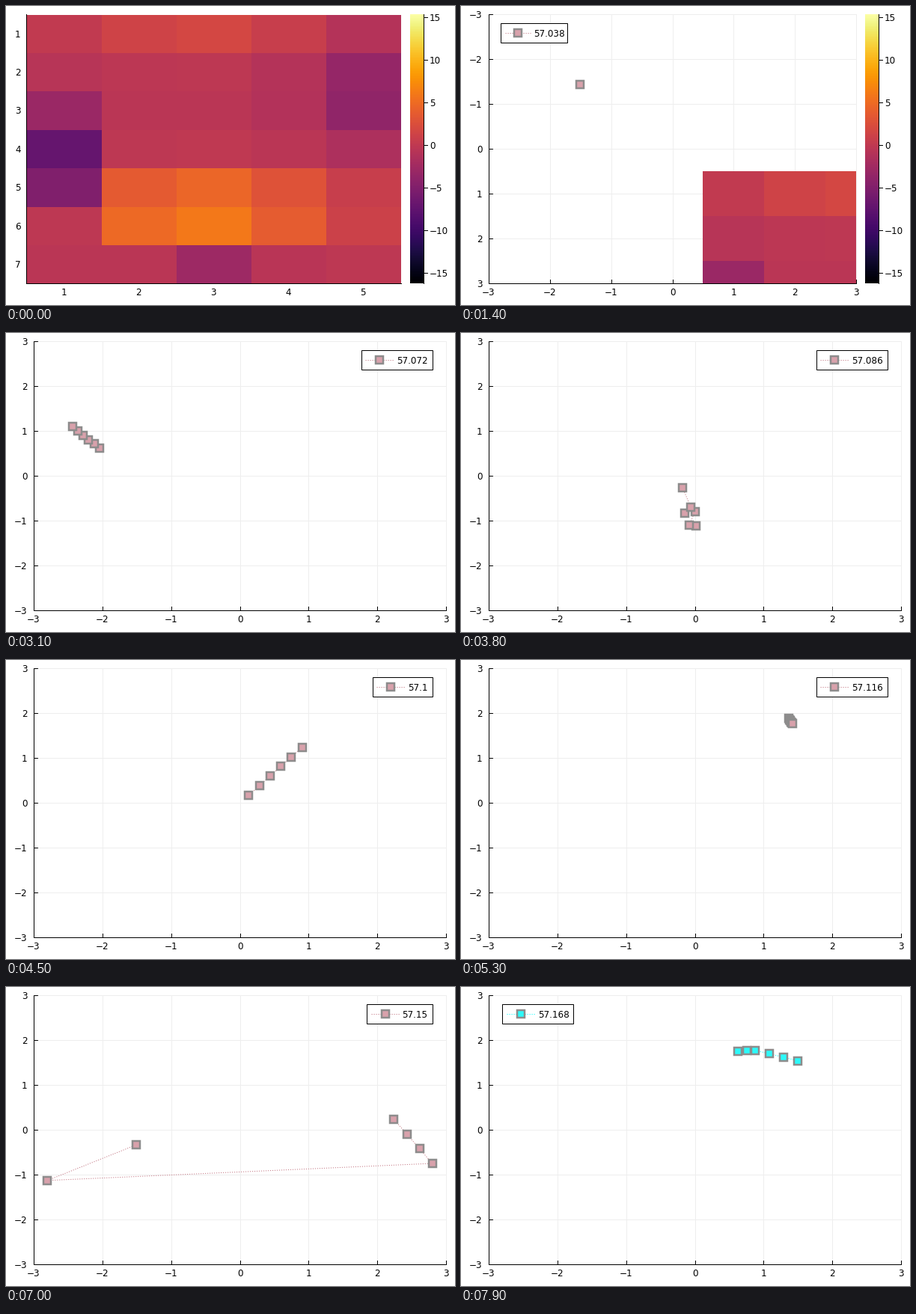
Animation, 600 px wide and 400 px high, one loop 8 s. Source, as a matplotlib script:

```python
import numpy as np
import matplotlib.pyplot as plt
from matplotlib.animation import FuncAnimation
from matplotlib.patches import Rectangle

W, H, DPI = 600, 400, 100
PX = 72 / DPI                      # points per pixel
FRAMES, STEP = 80, 100
LEFT, TOP, BOTTOM, MID = 37, 11, 371, 191
ROWS, COLS = 7, 5
FIRST = 14                         # frame of the first marker
CYAN_FROM = 77
TRAIL = 6

PINK, CYAN, EDGE = "#d8a1ab", "#2bfafa", "#8d8c8c"
PINK_LINE, CYAN_LINE = "#c8808c", "#19ffff"

plt.rcParams["font.family"] = "DejaVu Sans"
plt.rcParams["font.size"] = 12 * PX

# Warm and cold spots of the map: column, row, strength, width, height.
SPOTS = [
    (2.8, 5.6, .25, 1.8, .9),
    (1, 4.45, -.24, .5, 1.4),
    (5, 2.6, -.12, .8, 1.3),
    (2.8, 1, .07, 1.5, .6),
    (3, 7, -.1, .8, .5),
]

# Runs of the moving point: (step, x, y); steps between are interpolated.
RUNS = [
    [(14, -1.51, -1.44), (17, -1.55, -.7), (18, -1.74, -.27),
     (19, -1.83, -.1), (20, -1.74, -.02), (22, -1.74, .22), (31, -2.43, 1.1)],
    [(33, .02, -1.11), (34, -.08, -1.1), (35, 0, -.8), (36, -.15, -.84),
     (37, -.06, -.7), (38, -.18, -.26), (48, 1.37, 1.88), (53, 1.42, 1.76),
     (57, -1, -1.68)],
    [(59, -.39, 2.05), (60, -.76, 1.7), (61, -.63, 1.03), (64, -.21, .46),
     (66, -2.8, -1.13), (67, 2.8, -.75), (74, 1.5, 1.54), (77, .88, 1.77),
     (79, .63, 1.75)],
]

fig = plt.figure(figsize=(W / DPI, H / DPI), dpi=DPI, facecolor="white")
ax = fig.add_axes([0, 0, 1, 1])


def line(x, y, color="black", z=3, **kw):
    ax.plot(x, y, color=color, lw=PX, zorder=z, **kw)


def label(x, y, text, ha="center"):
    ax.text(x, y + 4.9, text, ha=ha, va="baseline", color="black", zorder=6)


def number(v):
    return str(v).replace("-", "\u2212")


def heat(col, row):
    return .5 + sum(a * np.exp(-((col - c) / w) ** 2 - ((row - r) / h) ** 2)
                    for c, r, a, w, h in SPOTS)


def trail(i):
    """Points shown at step i; empty between two runs."""
    for run in RUNS:
        steps, x, y = np.array(run).T
        if steps[0] <= i <= steps[-1]:
            s = np.arange(max(steps[0], i - TRAIL + 1), i + 1)
            return np.interp(s, steps, x), np.interp(s, steps, y)
    return None


def spines(left, right):
    line([left, left], [TOP, BOTTOM], solid_capstyle="projecting")
    line([left, right], [BOTTOM, BOTTOM], solid_capstyle="projecting")


def heatmap(left, top, cell_w, cell_h, right):
    clip = Rectangle((left, top), right - left, BOTTOM - top,
                     transform=ax.transData)
    for r in range(ROWS):
        for c in range(COLS):
            cell = Rectangle((left + c * cell_w, top + r * cell_h),
                             cell_w, cell_h, lw=0, antialiased=False,
                             fc=plt.cm.inferno(heat(c + 1, r + 1)), zorder=2)
            ax.add_patch(cell)
            cell.set_clip_path(clip)


def colorbar():
    ramp = np.linspace(1, 0, 256)[:, None]
    ax.imshow(ramp, cmap="inferno", vmin=0, vmax=1, aspect="auto",
              extent=(540, 558, BOTTOM, TOP), zorder=2)
    line([558, 558], [TOP, BOTTOM])
    for v in range(-15, 16, 5):
        y = 186 - v * 11.4
        line([558, 563], [y, y])
        label(566, y, number(v), "left")


def full_heatmap():
    left, right = 27, 528
    cell_w, cell_h = 100, (BOTTOM - TOP) / ROWS
    heatmap(left + .5, TOP + .5, cell_w, cell_h, right)
    spines(left, right)
    for c in range(COLS):
        label(left + cell_w * (c + .5), 382, number(c + 1))
    for r in range(ROWS):
        label(19.5, TOP + cell_h * (r + .5), number(r + 1), "right")
    colorbar()


def plane(right, sign):
    """Empty plot from -3 to 3 on both axes; gives the x unit."""
    unit = (right - LEFT) / 6
    for v in range(-3, 4):
        x = LEFT + (v + 3) * unit
        y = MID + sign * 60 * v
        line([x, x], [TOP, BOTTOM], "#eeeeee", 1)
        line([LEFT, right], [y, y], "#eeeeee", 1)
        line([x, x], [BOTTOM, BOTTOM - 5], z=1.5)
        line([LEFT, LEFT + 5], [y, y], z=1.5)
        label(x, 382, number(v))
        label(28.7, y, number(v), "right")
    spines(LEFT, right)
    return unit


def chain(x, y, cyan, z):
    """Dotted line with square markers on it."""
    line(x, y, CYAN_LINE if cyan else PINK_LINE, z, ls=(0, (1.2, 1.8)),
         dash_capstyle="butt")
    x, y = (x, y) if len(x) != 2 or z < 5 else ([np.mean(x)], [np.mean(y)])
    ax.plot(x, y, ls="none", marker="s", ms=10 * PX, mec=EDGE,
            mfc=CYAN if cyan else PINK, mew=2.5 * PX, zorder=z + .2)


def legend(text, cyan, left, width, sample):
    """Box with a dotted sample line, a marker and the time."""
    ax.add_patch(Rectangle((left, 23), width, 26, fc="white", ec="black",
                           lw=PX, zorder=5))
    a = left + 5.5
    chain([a, a + sample], [36, 36], cyan, 5.2)
    label(a + sample + 3.8, 36.3, text, "left")


def scatter(i):
    first = i == FIRST
    right, sign = (528, 1) if first else (588, -1)
    unit = plane(right, sign)
    if first:
        heatmap(LEFT + 3.5 * unit, MID + 30, unit, 60, right)
        colorbar()

    points = trail(i)
    if points is None:
        return
    cyan = i >= CYAN_FROM
    chain(LEFT + (points[0] + 3) * unit, MID + sign * 60 * points[1], cyan, 4)

    text = str(round(57.038 + .002 * (i - FIRST), 3))
    width = (89 if first else 95) - 7.63 * (6 - len(text))
    pad = (right - LEFT) / 30
    left = LEFT + pad if first or cyan else right - pad - width
    legend(text, cyan, left, width, 34 if first else 38)


def draw(i):
    ax.clear()
    if i < FIRST:
        full_heatmap()
    else:
        scatter(i)
    ax.set_xlim(0, W)
    ax.set_ylim(H, 0)
    ax.axis("off")
    return []


anim = FuncAnimation(fig, draw, frames=FRAMES, interval=STEP,
                     init_func=lambda: [], repeat=True, repeat_delay=0,
                     blit=False)
plt.show()
```
